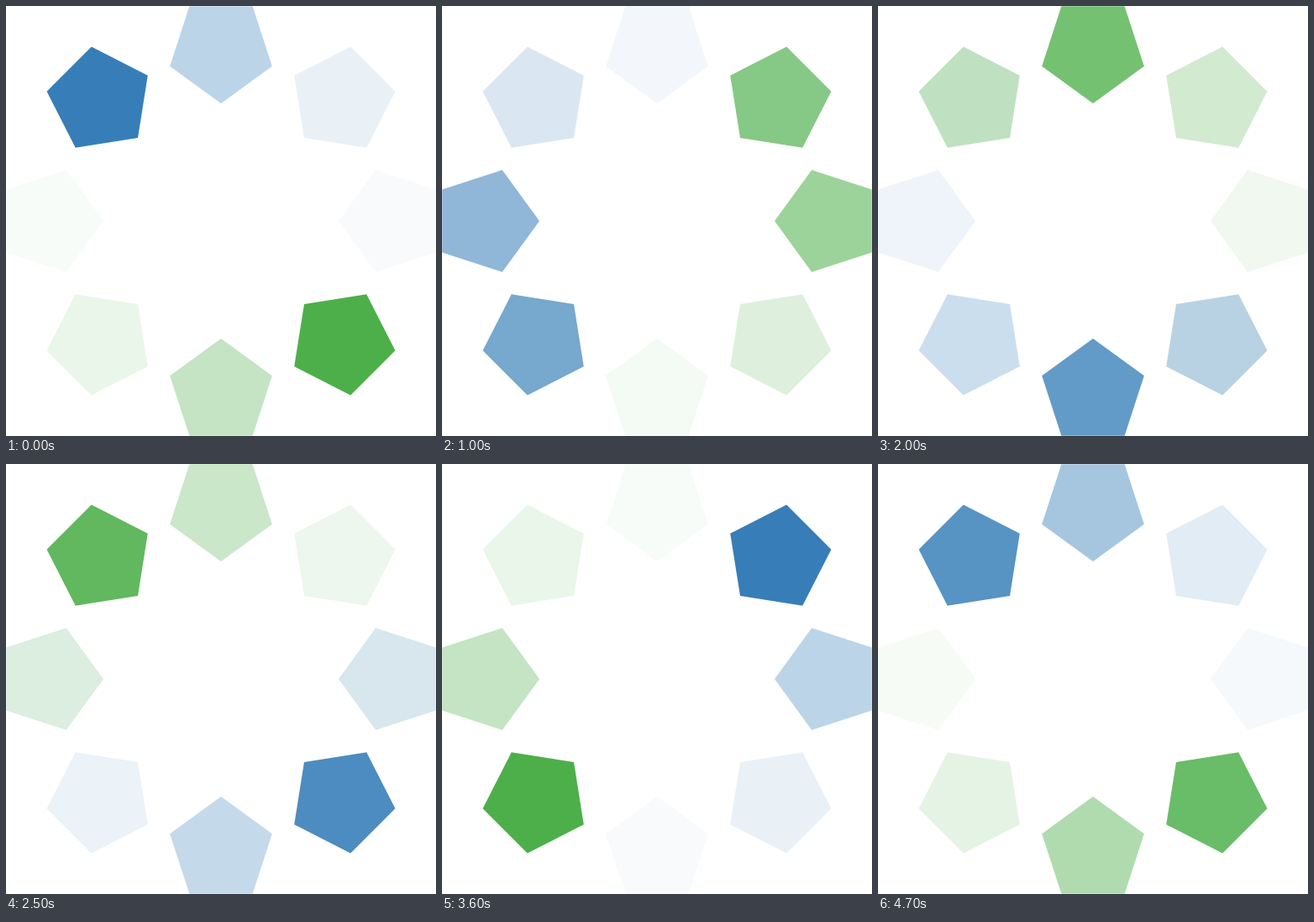
Write an HTML page with a canvas that moves like this. It is 512 by 512 pixels and loops after 4.8 s.

```html
<!DOCTYPE html>
<html>
<head>
<meta charset="utf-8">
<style>
html, body { margin: 0; width: 100%; height: 100%; overflow: hidden; background: #fff; }
canvas { display: block; width: 512px; height: 512px; }
</style>
</head>
<body>
<canvas id="stage" width="512" height="512"></canvas>
<script>
const ctx = document.getElementById('stage').getContext('2d');
const LOOP = 4800, STEP = 600, TICK = 100;
const COUNT = 8, RING = 204, RADIUS = 64;
const BLUE = [55, 126, 184], GREEN = [77, 175, 74];

// Colour on white, a whole number of steps into the cycle: each hue decays over four steps.
function shade(n) {
  const alpha = 3 ** -(n % 4);
  return (n % COUNT < 4 ? BLUE : GREEN).map(c => 255 + (c - 255) * alpha);
}

function colorAt(phase) {
  const n = Math.floor(phase), next = shade(n + 1);
  return `rgb(${shade(n).map((c, k) => Math.round(c + (next[k] - c) * (phase - n)))})`;
}

// One corner points at the centre of the ring.
function pentagon(angle, color) {
  const cx = 256 + RING * Math.cos(angle), cy = 256 + RING * Math.sin(angle);
  ctx.beginPath();
  for (let k = 0; k < 5; k++) {
    const a = angle + Math.PI + k * Math.PI * 2 / 5;
    ctx.lineTo(cx + RADIUS * Math.cos(a), cy + RADIUS * Math.sin(a));
  }
  ctx.fillStyle = color;
  ctx.fill();
}

function draw(time) {
  const t = Math.floor(time % LOOP / TICK) * TICK;
  ctx.fillStyle = '#fff';
  ctx.fillRect(0, 0, 512, 512);
  for (let i = 0; i < COUNT; i++) {
    const phase = (t / STEP - i + COUNT) % COUNT;
    pentagon((5 - i) * Math.PI / 4, colorAt(phase));
  }
}

const start = performance.now();
function frame() {
  draw(performance.now() - start);
  requestAnimationFrame(frame);
}
frame();
</script>
</body>
</html>
```
